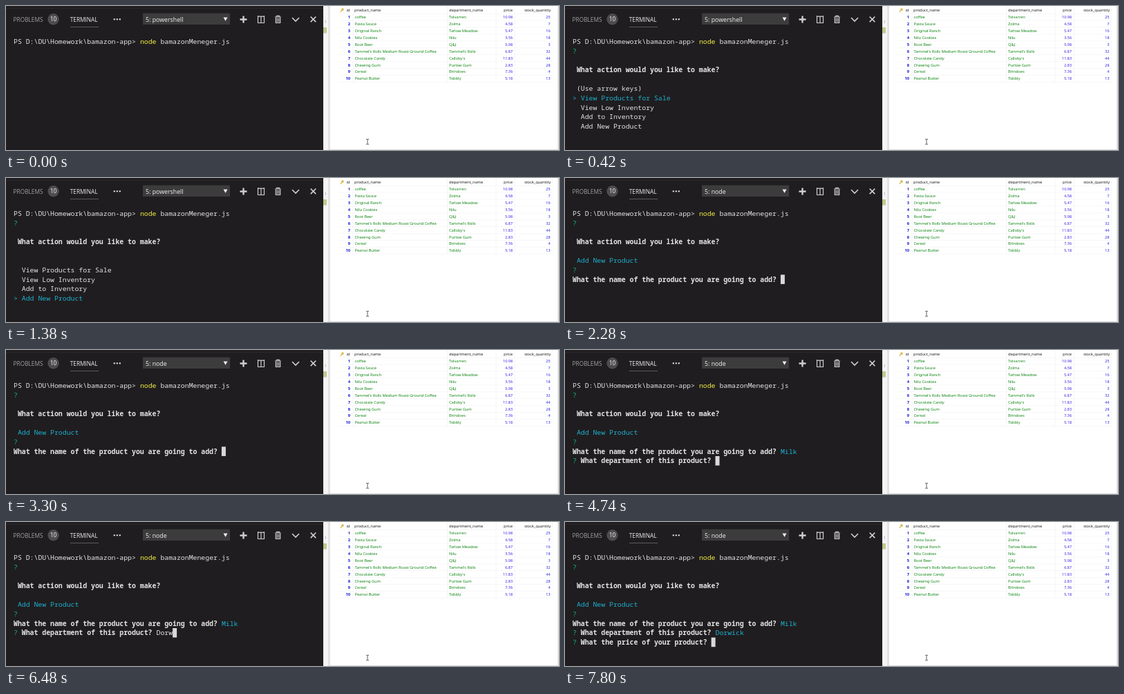
These frames come from a looping animation (800 by 209 pixels, 8 s). An HTML page:

```html
<!DOCTYPE html>
<html lang="en">
<head>
<meta charset="utf-8">
<title>Terminal and product table</title>
<style>
  html, body { margin: 0; width: 100%; height: 100%; overflow: hidden; background: #1f1d1f; }
  svg { display: block; width: 100%; height: 100%; }
  text { white-space: pre; }
  .term { font: 9.833px "Noto Sans Mono", "DejaVu Sans Mono", monospace; }
  .ui { font: 8.3px "Open Sans", "Noto Sans", sans-serif; }
  .grid { font: 5.8px "Noto Sans", "Open Sans", sans-serif; letter-spacing: -0.1px; }
  .bold { font-weight: 700; }
</style>
</head>
<body>
<svg id="stage" viewBox="0 0 800 209" preserveAspectRatio="none"></svg>
<script>
const LOOP = 8000, COL = 5.9, ROW = 13.65, LEFT = 11, BASE = 55.1;
const WHITE = '#e4e4e4', CYAN = '#1fb0cf', GREEN = '#16b27c', YELLOW = '#f2f242';
const stage = document.getElementById('stage');

function add(parent, tag, attrs, content) {
  const el = document.createElementNS('http://www.w3.org/2000/svg', tag);
  for (const key in attrs) el.setAttribute(key, attrs[key]);
  if (content !== undefined) el.textContent = content;
  parent.appendChild(el);
  return el;
}
const rect = (x, y, width, height, fill) =>
  add(stage, 'rect', { x, y, width, height, fill });
const label = (cls, x, y, fill, content, anchor = 'start') =>
  add(stage, 'text', { class: cls, x, y, fill, 'text-anchor': anchor }, content);
const line = (d, stroke, width = 1) =>
  add(stage, 'path', { d, stroke, 'stroke-width': width, fill: 'none' });

// Panel header
function drawHeader() {
  rect(0, 0, 459, 209, '#1f1d1f');
  line('M0 3.5H459', '#2b292b');
  label('ui', 10.6, 22.5, '#a2a2a2', 'PROBLEMS');
  add(stage, 'circle', { cx: 68.5, cy: 19.3, r: 8.2, fill: '#4d4d4d' });
  label('ui', 68.5, 22.4, '#ffffff', '10', 'middle');
  label('ui', 92.7, 22.5, '#f0f0f0', 'TERMINAL');
  line('M93 30.5H134', '#5c5c5c');
  for (let i = 0; i < 3; i++) add(stage, 'circle', { cx: 156.8 + i * 4, cy: 19.3, r: 1.2, fill: '#d0d0d0' });

  rect(198, 10.5, 126, 16.5, '#3c3c3c');
  add(stage, 'path', { d: 'M314.5 16.6H320.5L317.5 21.8Z', fill: '#f0f0f0' });

  const icon = '#cfcfcf';
  line('M343.5 14.5V24.5M338.5 19.5H348.5', icon, 2.4);
  line('M364 15.2H374M364.5 14V24.5H373.5V14M369 15V24.5', icon, 1.2);
  line('M389 16H398M391.5 15.5V14.3H395.5V15.5', icon, 1.2);
  line('M390.3 17V24.3H396.7V17M392.4 17.5V23M394.6 17.5V23', icon, 1.2);
  line('M414 17L419 22L424 17', icon, 1.6);
  line('M440.7 15.5L448.3 23.1M448.3 15.5L440.7 23.1', icon, 1.7);
}

// Database window
const rows = [
  ['coffee', 'Tolvarren', '10.98', 25],
  ['Pasta Sauce', 'Zolma', '4.58', 7],
  ['Original Ranch', 'Tarlow Meadow', '5.47', 16],
  ['Nilu Cookies', 'Nilu', '3.56', 18],
  ['Root Beer', 'Q&J', '5.98', 3],
  ["Tammel's Rolls Medium Roast Ground Coffee", "Tammel's Rolls", '6.87', 32],
  ['Chocolate Candy', "Calloby's", '11.83', 44],
  ['Chewing Gum', 'Purlow Gum', '2.83', 28],
  ['Cereal', 'Brindoes', '7.36', 4],
  ['Peanut Butter', 'Tobbly', '5.18', 13]
];

function drawTable() {
  rect(459, 0, 341, 209, '#ffffff');
  rect(459, 0, 7, 209, '#f5f5f5');
  rect(466, 0, 3, 209, '#e2e2e4');
  rect(459, 31, 5, 8.5, '#bccb8e');
  label('grid', 460.5, 25, '#999', '1');
  rect(798, 0, 2, 209, '#dcdcdc');
  rect(469, 208, 331, 1, '#dcdcdc');
  for (let i = 0; i <= rows.length; i++) line(`M481 ${11.2 + i * 9.9}H790`, '#f5f5f5', 0.7);
  for (const x of [502, 638.5, 709, 736, 790]) line(`M${x} 0V110.2`, '#f1f1f1', 0.7);

  add(stage, 'circle', { cx: 487, cy: 5, r: 1.7, fill: '#d6b53c' });
  line('M486 6L483.8 8.6', '#d6b53c', 1.2);
  const ink = '#262626';
  label('grid', 497.5, 8.2, ink, 'id', 'end');
  label('grid', 504, 8.2, ink, 'product_name');
  label('grid', 641, 8.2, ink, 'department_name');
  label('grid', 733, 8.2, ink, 'price', 'end');
  label('grid', 788, 8.2, ink, 'stock_quantity', 'end');

  rows.forEach(([name, dept, price, stock], i) => {
    const y = 18.2 + i * 9.9;
    label('grid bold', 498, y, '#1414d2', i + 1, 'end');
    label('grid', 504.5, y, '#16891a', name);
    label('grid', 641, y, '#16891a', dept);
    label('grid', 733, y, '#4a2ae6', price, 'end');
    label('grid', 787.5, y, '#2f2fea', stock, 'end');
  });
  line('M521 193.3H522.4L523 194L523.6 193.3H525M523 194V200M521 200.7H522.4L523 200L523.6 200.7H525', '#333', 0.8);
}

drawHeader();
drawTable();
const shell = label('ui', 202, 22.8, '#f4f4f4', '');
shell.style.fontSize = '8.8px';
const term = add(stage, 'g', { class: 'term' });

const print = (row, col, content, fill = WHITE, bold = false) =>
  add(term, 'text', { x: LEFT + col * COL, y: BASE + row * ROW, fill, class: bold ? 'bold' : '' }, content);
const cursor = (row, col) =>
  add(term, 'rect', { x: LEFT + col * COL, y: 44.8 + row * ROW, width: 6, height: 13.6, fill: '#d8d8d8' });

const MENU = ['View Products for Sale', 'View Low Inventory', 'Add to Inventory', 'Add New Product'];
const MENU_AT = 60, ARROWS = [900, 1080, 1260], PICK_AT = 1860;
const QUESTIONS = [
  { row: 7, mark: '', ask: 'What the name of the product you are going to add? ',
    answer: 'Milk', keys: [3660, 3840, 4080, 4440], enter: 4680 },
  { row: 8, mark: '? ', ask: 'What department of this product? ',
    answer: 'Dorwick', keys: [5700, 5940, 6180, 6420, 6540, 6660, 6780], enter: 7020 },
  { row: 9, mark: '? ', ask: 'What the price of your product? ',
    answer: '', keys: [], enter: LOOP }
];
const passed = (times, t) => times.filter(at => t >= at).length;

function drawMenu(t) {
  const chosen = passed(ARROWS, t);
  if (!chosen) print(5, 1, '(Use arrow keys)');
  MENU.forEach((item, i) => {
    if (i === chosen) print(6 + i, 0, '>', CYAN);
    print(6 + i, 2, item, i === chosen ? CYAN : WHITE);
  });
}

function drawQuestions(t) {
  print(5, 1, MENU[3], CYAN);
  print(6, 0, '?', GREEN);
  for (const q of QUESTIONS) {
    const start = q.mark.length, end = start + q.ask.length;
    const typed = q.answer.slice(0, passed(q.keys, t));
    const done = t >= q.enter;
    if (q.mark) print(q.row, 0, '?', GREEN);
    print(q.row, start, q.ask, WHITE, true);
    print(q.row, end, typed, done ? CYAN : WHITE);
    if (!done) {
      cursor(q.row, end + typed.length);
      break;
    }
  }
}

function render(t) {
  shell.textContent = t < PICK_AT ? '5: powershell' : '5: node';
  term.replaceChildren();
  print(0, 0, 'PS D:\\DU\\Homework\\bamazon-app>');
  print(0, 31, 'node', YELLOW);
  print(0, 36, 'bamazonMeneger.js');
  if (t < MENU_AT) return;
  print(1, 0, '?', GREEN);
  print(3, 1, 'What action would you like to make?', WHITE, true);
  if (t < PICK_AT) drawMenu(t);
  else drawQuestions(t);
}

const begin = performance.now();
function tick() {
  render((performance.now() - begin) % LOOP);
  requestAnimationFrame(tick);
}
tick();
</script>
</body>
</html>
```
